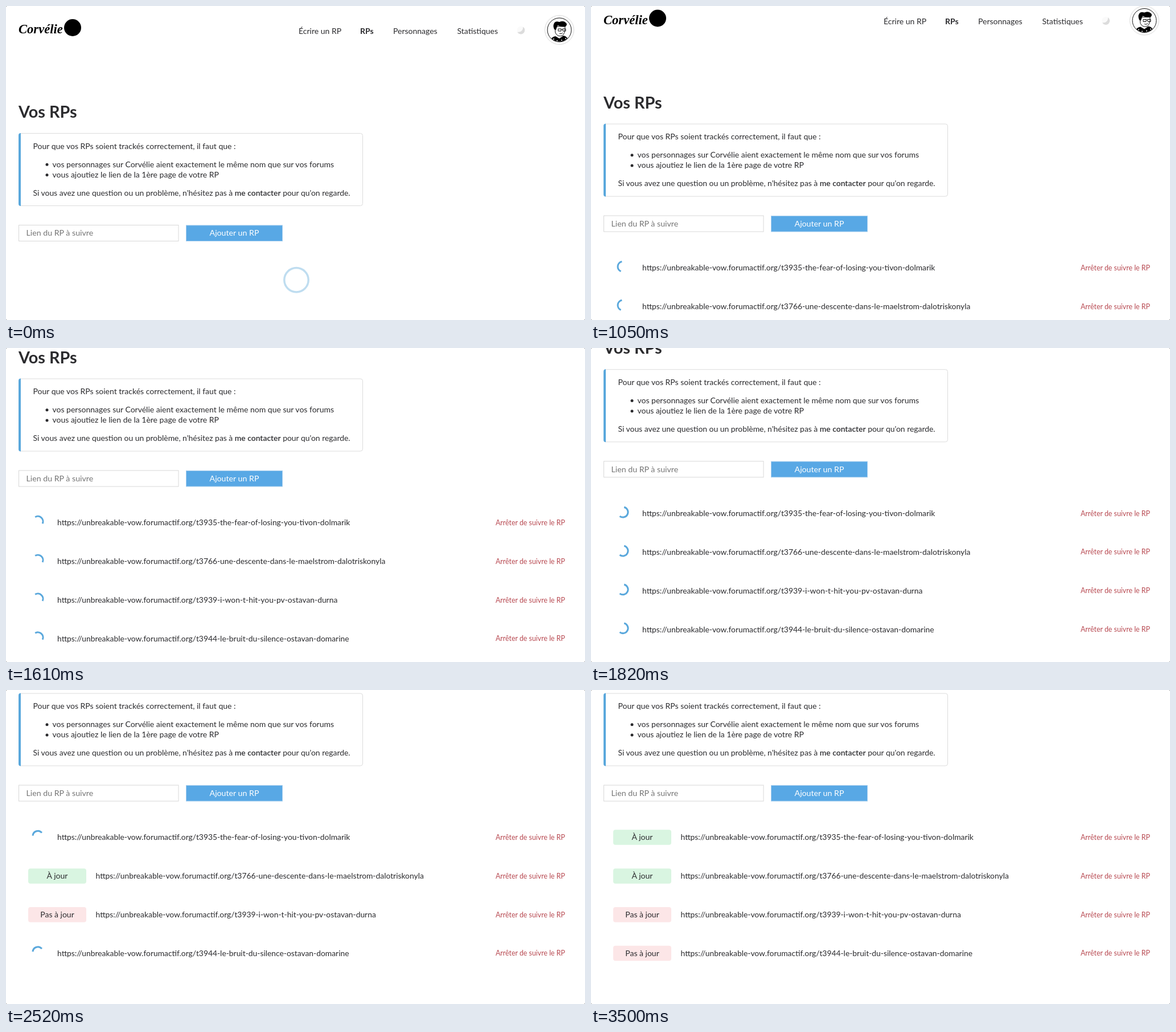
An HTML page for the animation above (4.69 s loop, 1017x551 px).

```html
<!DOCTYPE html>
<html lang="fr">
<head>
<meta charset="utf-8">
<title>Vos RPs</title>
<style>
  html, body { margin: 0; width: 100%; height: 100%; overflow: hidden; background: #777; }
  svg { display: block; width: 1017px; height: 551px; background: #fff; border-radius: 2px; }
  text { font: 14px Lato, "Open Sans", sans-serif; fill: #2b2b2e; }
  .bold { font-weight: 700; }
  .semi { font-weight: 600; }
  .title { font-size: 28.8px; font-weight: 700; }
  .brand { font: italic bold 22.6px "Liberation Serif", serif; fill: #000; }
  .hint { font-size: 14.2px; fill: #757575; }
  .button { font-size: 14.2px; fill: #fff; text-anchor: middle; }
  .url { font-size: 13.85px; }
  .stop { font-size: 12.4px; fill: #b84a52; text-anchor: end; }
  .status { text-anchor: middle; }
  .arc { fill: none; stroke: #5aa8dc; stroke-width: 3; }
  .line { fill: none; stroke: #111; stroke-width: 1; }
</style>
</head>
<body>
<svg viewBox="0 0 1017 551">
  <defs>
    <clipPath id="face"><circle cx="972" cy="42" r="20.5"/></clipPath>
  </defs>
  <g id="page">
    <text class="brand" x="22" y="48">Corvélie</text>
    <circle cx="117" cy="38" r="15"/>

    <text x="514" y="48.5">Écrire un RP</text>
    <text x="622" y="48.5" class="bold">RPs</text>
    <text x="680" y="48.5">Personnages</text>
    <text x="792.5" y="48.5">Statistiques</text>

    <circle cx="904" cy="42" r="6.5" fill="#fafafa"/>
    <path d="M908 36.5A7 7 0 1 1 898 45.5A8 8 0 0 0 908 36.5" fill="#dcdcdc"/>

    <circle cx="972" cy="42" r="25.5" fill="#fff" stroke="#d9d9d9"/>
    <g clip-path="url(#face)">
      <path d="M955 64Q957 54 965 53L972 57L979 52Q987 53 989 64Z"/>
      <g fill="#fff">
        <circle cx="962" cy="58" r="1"/><circle cx="968" cy="61" r="1"/>
        <circle cx="976" cy="60" r="1"/><circle cx="983" cy="57" r="1"/>
      </g>
      <path class="line" style="fill:#fff" d="M964 36L965 47Q969 55 977 52Q982 49 982 36Z"/>
      <path d="M963 41Q960 34 963 30Q965 26 972 28Q979 25 983 29Q987 32 983 36Q976 37 969 34Q967 38 966 42Z"/>
      <path class="line" d="M970 40h5v4h-5zM978 40h5v4h-5zM975 41h3M972 48Q975 50 978 47"/>
    </g>
    <circle cx="972" cy="42" r="21" class="line"/>

    <text class="title" x="22" y="196">Vos RPs</text>

    <rect x="22.5" y="223.5" width="604" height="127" rx="4" fill="#fff" stroke="#dcdcdc"/>
    <path d="M26 223V351Q22 351 22 347V227Q22 223 26 223Z" fill="#5aa8dc"/>
    <text x="47.5" y="250.5">Pour que vos RPs soient trackés correctement, il faut que :</text>
    <circle cx="72" cy="278.3" r="2.5" fill="#2b2b2e"/>
    <text x="81.5" y="282.5">vos personnages sur Corvélie aient exactement le même nom que sur vos forums</text>
    <circle cx="72" cy="296.5" r="2.5" fill="#2b2b2e"/>
    <text x="81.5" y="300.7">vous ajoutiez le lien de la 1ère page de votre RP</text>
    <text x="47.5" y="332.5" style="font-size:13.9px">Si vous avez une question ou un problème, n'hésitez pas à <tspan class="semi">me contacter</tspan> pour qu'on regarde.</text>

    <rect x="22.5" y="384.5" width="280.5" height="28" fill="#fff" stroke="#d8d8d8"/>
    <text class="hint" x="35.5" y="403.3">Lien du RP à suivre</text>
    <rect x="316.5" y="384.9" width="169" height="27.6" fill="#58a8e5" stroke="#a4cdee"/>
    <text class="button" x="401" y="403.3">Ajouter un RP</text>

    <circle id="loader" cx="510" cy="480.7" r="21.2" fill="none" stroke="#bfddf0" stroke-width="3.5"/>
    <g id="list"></g>
  </g>
</svg>
<script>
const LOOP = 4690, STEP = 70, ROWS_AT = 280;
const TURN = 1450, TURN_ANGLE = 420;
const $ = id => document.getElementById(id);

// Each key is [time, value, ...]
const scrollKeys = [[980, 0], [1120, 33], [1330, 106], [1470, 145], [1610, 169.5], [1750, 183],
  [1890, 188.5], [2170, 189], [2240, 197], [2380, 214], [2450, 217.5]];
// Start and end angle of the spinner arc over one turn
const arcKeys = [[0, 30, 340], [300, 215, 350], [560, 305, 415], [840, 328, 475], [1400, 450, 750], [TURN, 450, 760]];

const base = 'https://unbreakable-vow.forumactif.org/';
const rows = [
  { path: 't3935-the-fear-of-losing-you-tivon-dolmarik', doneAt: 3080, ok: true },
  { path: 't3766-une-descente-dans-le-maelstrom-dalotriskonyla', doneAt: 1890, ok: true },
  { path: 't3939-i-won-t-hit-you-pv-ostavan-durna', doneAt: 2030, ok: false },
  { path: 't3944-le-bruit-du-silence-ostavan-domarine', doneAt: 3500, ok: false }
];

$('list').innerHTML = rows.map(({ path, ok }, i) => `
  <g transform="translate(0 ${475.8 + i * 67.85})">
    <path class="arc"/>
    <g class="badge">
      <rect x="39" y="-13" width="102" height="26.5" rx="4" fill="${ok ? '#d9f5e1' : '#fce6e7'}"/>
      <text class="status" x="90" y="5">${ok ? 'À jour' : 'Pas à jour'}</text>
    </g>
    <text class="url" y="5">${base}${path}</text>
    <text class="stop" x="982" y="4.5">Arrêter de suivre le RP</text>
  </g>`).join('');

rows.forEach((row, i) => {
  const g = $('list').children[i];
  for (const name of ['arc', 'badge', 'url']) row[name] = g.querySelector('.' + name);
});

function sample(keys, t, col = 1) {
  const i = keys.findIndex(k => k[0] > t);
  if (i === 0) return keys[0][col];
  if (i < 0) return keys.at(-1)[col];
  const a = keys[i - 1], b = keys[i];
  return a[col] + (b[col] - a[col]) * (t - a[0]) / (b[0] - a[0]);
}

function arcPath(t) {
  const since = t - 770, turn = Math.floor(since / TURN);
  const angle = col => sample(arcKeys, since - turn * TURN, col) + turn * TURN_ANGLE;
  const point = deg => {
    const a = deg * Math.PI / 180;
    return `${56 + 9 * Math.sin(a)} ${-2 - 9 * Math.cos(a)}`;
  };
  const start = angle(1), end = angle(2);
  return `M${point(start)}A9 9 0 ${end - start > 180 ? 1 : 0} 1 ${point(end)}`;
}

const show = (el, on) => el.setAttribute('visibility', on ? 'inherit' : 'hidden');

function draw(now) {
  const t = Math.floor(now % LOOP / STEP) * STEP;
  $('page').setAttribute('transform', `translate(0 ${-sample(scrollKeys, t)})`);
  show($('loader'), t < ROWS_AT);
  show($('list'), t >= ROWS_AT);
  const arc = arcPath(t);
  for (const row of rows) {
    const done = t >= row.doneAt;
    row.arc.setAttribute('d', arc);
    show(row.arc, !done);
    show(row.badge, done);
    row.url.setAttribute('x', done ? 157.5 : 90);
  }
}

const began = performance.now();
function tick() {
  draw(performance.now() - began);
  requestAnimationFrame(tick);
}
tick();
</script>
</body>
</html>
```
